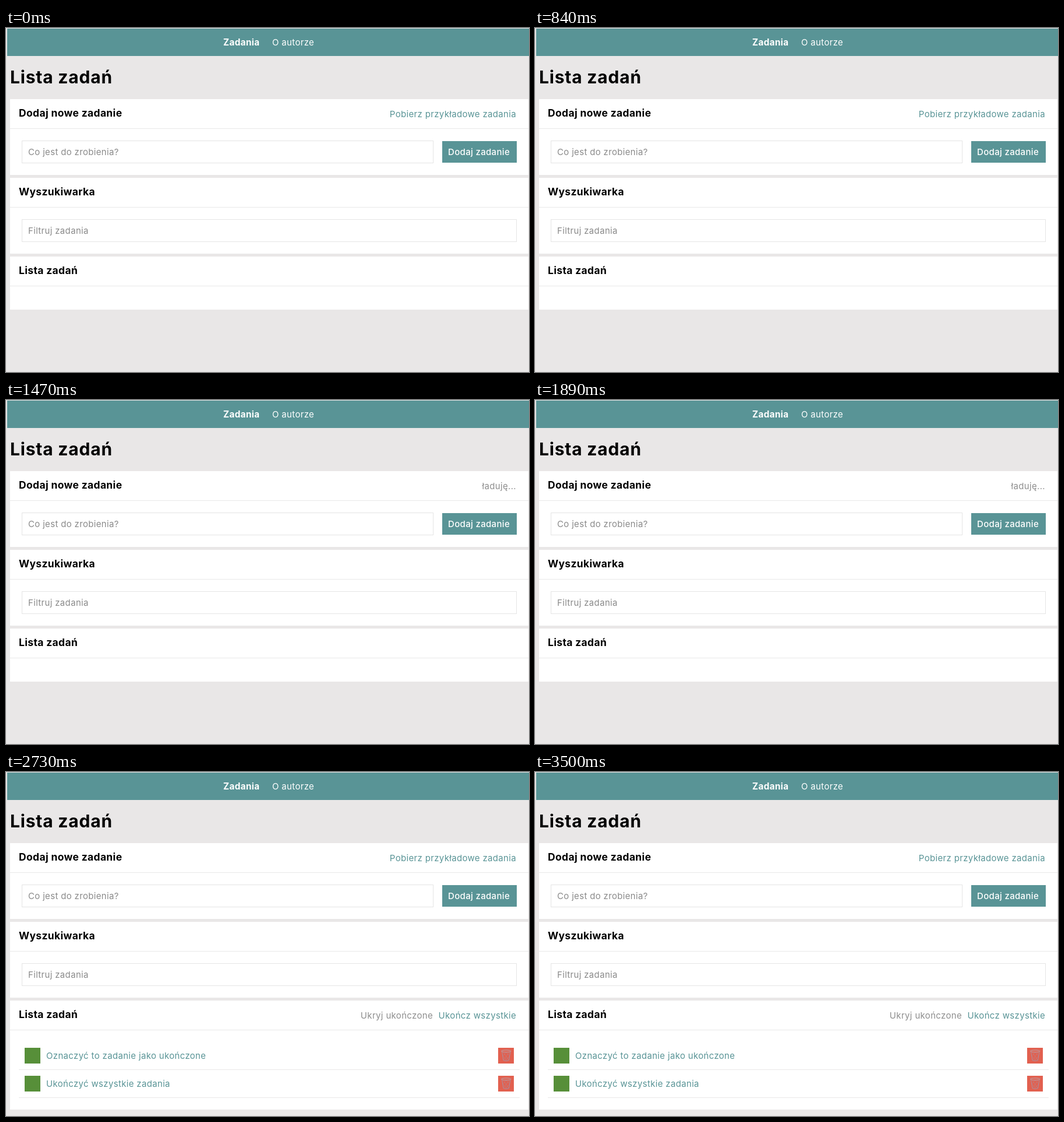
An HTML page for the animation above (3.57 s loop, 898x590 px).

```html
<!DOCTYPE html>
<html lang="pl">
<head>
<meta charset="utf-8">
<title>Lista zadań</title>
<style>
  html, body { margin: 0; width: 100%; height: 100%; overflow: hidden; background: #e9e7e7; }
  svg { display: block; width: 898px; height: 590px; }
  text { font: 400 15px Inter, "Open Sans", sans-serif; letter-spacing: .33px; }
  .title { font-size: 30px; font-weight: 700; letter-spacing: .8px; }
  .head { font-size: 17.5px; font-weight: 700; }
  .bold { font-size: 15.3px; font-weight: 700; }
  .end { text-anchor: end; }
  .hint { fill: #8a8a8a; }
  .off { fill: #8e8e8e; }
  .teal { fill: #599496; }
  .white { fill: #fff; }
  .field { fill: #fff; stroke: #e5e5e5; }
  .rule { fill: #e9e8e8; }
</style>
</head>
<body>
<svg viewBox="0 0 898 590">
  <defs>
    <g id="bin">
      <rect width="27" height="27" fill="#e2604f"/>
      <g fill="none" stroke="#a9909f">
        <path d="M6.5 6.5L9 21.5Q13.500 23.500 18.500 21.5L21 6.5"/>
        <path d="M9 8L18 21M18.500 8L9.500 21M13.700 8L20 14M13.700 8L8 14M8 14L15 22M20 14L12 22" stroke-width=".7" opacity=".65"/>
        <ellipse cx="13.700" cy="5.700" rx="8.300" ry="1.700" stroke="#b9a5ad"/>
      </g>
    </g>
  </defs>

  <rect width="898" height="590" fill="#e9e7e7"/>
  <rect class="teal" x="2" y="1" width="896" height="47"/>
  <text class="white bold" x="373" y="30">Zadania</text>
  <text class="white" x="457" y="30">O autorze</text>
  <text class="title" x="7" y="95">Lista zadań</text>

  <rect class="white" x="7" y="122" width="890" height="130"/>
  <rect class="rule" x="7" y="172" width="890" height="1"/>
  <text class="head" x="22" y="152">Dodaj nowe zadanie</text>
  <text class="end" id="link" x="876" y="153">Pobierz przykładowe zadania</text>
  <rect class="field" x="27.5" y="193.5" width="706" height="38"/>
  <text class="hint" x="38" y="218">Co jest do zrobienia?</text>
  <rect class="teal" x="749" y="194" width="128" height="37"/>
  <text class="white" x="759" y="218" style="font-weight:500">Dodaj zadanie</text>

  <rect class="white" x="7" y="257" width="890" height="130"/>
  <rect class="rule" x="7" y="307" width="890" height="1"/>
  <text class="head" x="22" y="287">Wyszukiwarka</text>
  <rect class="field" x="27.5" y="328.5" width="849" height="38"/>
  <text class="hint" x="38" y="353">Filtruj zadania</text>

  <rect class="white" id="panel" x="7" y="392" width="890" height="91"/>
  <rect class="rule" x="7" y="442" width="890" height="1"/>
  <text class="head" x="22" y="422">Lista zadań</text>

  <g id="tasks" visibility="hidden">
    <text class="off end" x="733" y="423">Ukryj ukończone</text>
    <text class="teal end" x="876" y="423">Ukończ wszystkie</text>
    <rect x="32" y="473" width="27" height="27" fill="#578f39"/>
    <text class="teal" x="69" y="492">Oznaczyć to zadanie jako ukończone</text>
    <use href="#bin" x="845" y="473"/>
    <rect class="rule" x="22" y="510" width="860" height="1"/>
    <rect x="32" y="521" width="27" height="27" fill="#578f39"/>
    <text class="teal" x="69" y="540">Ukończyć wszystkie zadania</text>
    <use href="#bin" x="845" y="521"/>
    <rect class="rule" x="22" y="558" width="860" height="1"/>
  </g>
</svg>
<script>
  const LOOP = 3570, CLICK = 980, LOADED = 2030, FADE = 400;
  const ACTIVE = [89, 148, 150], DISABLED = [142, 142, 142];
  const [link, panel, tasks] = ['link', 'panel', 'tasks'].map(id => document.getElementById(id));

  const fade = (t, start) => {
    const p = Math.min(1, Math.max(0, (t - start) / FADE));
    return p * p * (3 - 2 * p);
  };

  function draw(t) {
    const loading = t >= CLICK && t < LOADED;
    const loaded = t >= LOADED;
    const grey = fade(t, CLICK) - fade(t, LOADED);
    const color = ACTIVE.map((c, i) => Math.round(c + (DISABLED[i] - c) * grey));
    link.textContent = loading ? 'ładuję...' : 'Pobierz przykładowe zadania';
    link.setAttribute('fill', `rgb(${color})`);
    panel.setAttribute('height', loaded ? 187 : 91);
    tasks.setAttribute('visibility', loaded ? 'visible' : 'hidden');
  }

  const start = performance.now();
  function tick() {
    draw((performance.now() - start) % LOOP);
    requestAnimationFrame(tick);
  }
  draw(0);
  requestAnimationFrame(tick);
</script>
</body>
</html>
```
